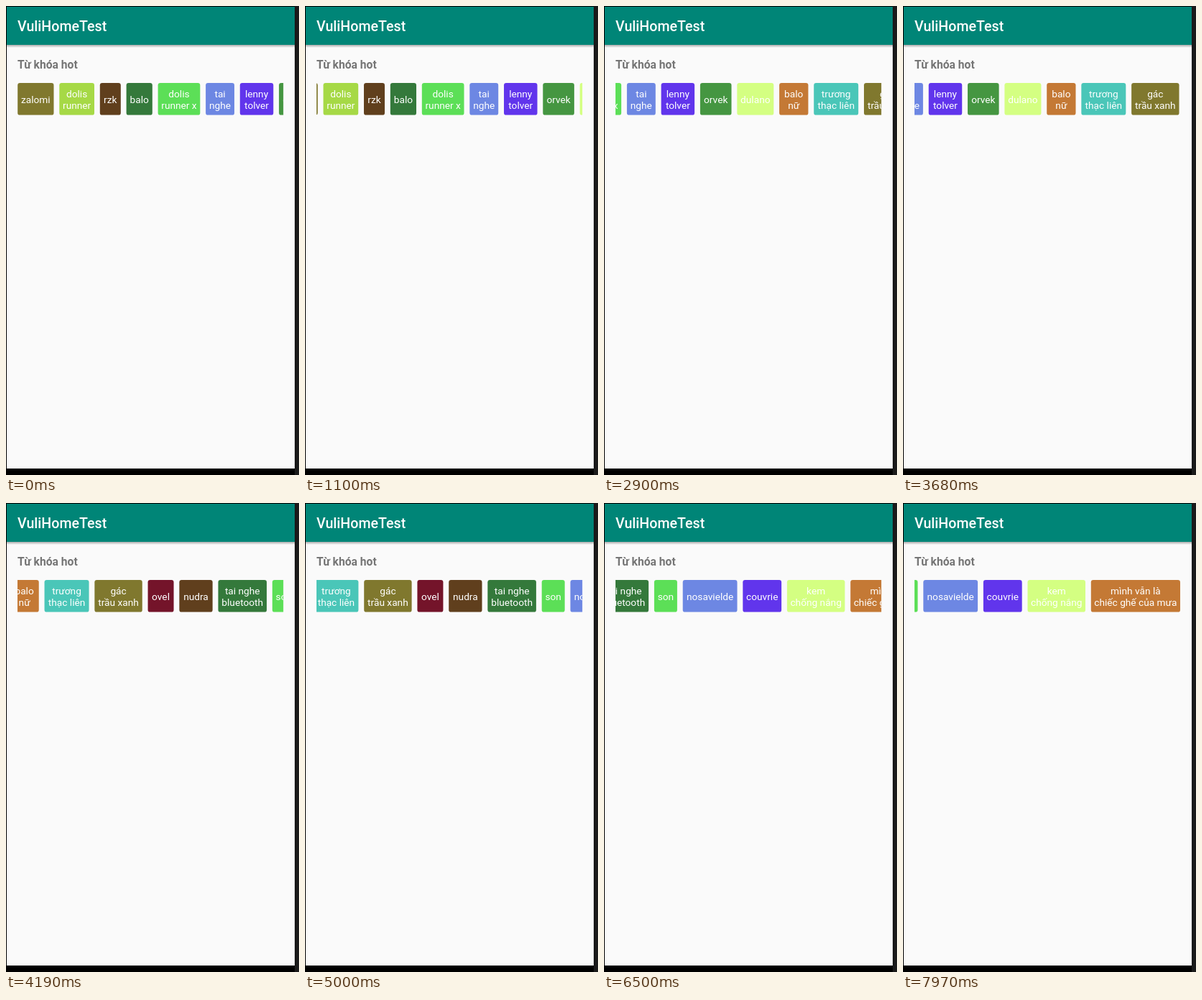
Recreate the animation shown at these times as an HTML page. Size 408 by 652 pixels, loop 8000 ms.

```html
<!DOCTYPE html>
<html lang="vi">
<head>
<meta charset="utf-8">
<title>Home</title>
<style>
  html, body { margin: 0; width: 100%; height: 100%; overflow: hidden; background: #000; }
  svg { display: block; width: 100%; height: 100%; font-family: Roboto, sans-serif; }
  .chip { font-size: 13.7px; fill: #fff; text-anchor: middle; }
</style>
</head>
<body>
<svg viewBox="0 0 408 652">
  <defs>
    <clipPath id="view"><rect x="16" y="106" width="370.2" height="47"/></clipPath>
    <linearGradient id="shade" x2="0" y2="1">
      <stop stop-color="#000" stop-opacity=".32"/>
      <stop offset="1" stop-color="#000" stop-opacity="0"/>
    </linearGradient>
  </defs>
  <rect width="408" height="652" fill="#000"/>
  <rect x="402" width="6" height="652" fill="#1a1a1a"/>
  <rect x="1" y="1" width="401" height="642" fill="#fafafa"/>
  <rect x="1" y="1" width="401" height="53" fill="#008577"/>
  <rect x="1" y="54" width="401" height="4" fill="url(#shade)"/>
  <text x="16" y="35" font-size="19.6" font-weight="500" fill="#fff">VuliHomeTest</text>
  <text x="16" y="87" font-size="15.65" font-weight="700" fill="#757575">Từ khóa hot</text>
  <g clip-path="url(#view)"><g id="row"></g></g>
</svg>
<script>
const LOOP = 8000, STEP = 30, GAP = 7.8;
const row = document.getElementById('row');

// label ("/" breaks the line), width, colour
const chips = [
  ['zalomi', 50.3, '#80782e'],
  ['dolis/runner', 48.7, '#a6d946'],
  ['rzk', 29, '#603f1d'],
  ['balo', 36.2, '#34793b'],
  ['dolis/runner x', 58.7, '#5cdf57'],
  ['tai/nghe', 39.9, '#6d87e3'],
  ['lenny/tolver', 46.5, '#6135ec'],
  ['orvek', 43.6, '#459641'],
  ['dulano', 51, '#d4ff82'],
  ['balo/nữ', 40.3, '#c47935'],
  ['trương/thạc liên', 62, '#4ac6b8'],
  ['gác/trầu xanh', 66.4, '#80782e'],
  ['ovel', 36, '#74142a'],
  ['nudra', 46.3, '#603f1d'],
  ['tai nghe/bluetooth', 67.6, '#34793b'],
  ['son', 32, '#5cdf57'],
  ['nosavielde', 75.8, '#6d87e3'],
  ['couvrie', 53.8, '#6135ec'],
  ['kem/chống nắng', 80.5, '#d4ff82'],
  ['mình vẫn là/chiếc ghế của mưa', 124.2, '#c47935']
];

function add(tag, attrs, text = '') {
  const el = document.createElementNS('http://www.w3.org/2000/svg', tag);
  for (const k in attrs) el.setAttribute(k, attrs[k]);
  el.textContent = text;
  row.append(el);
}

let x = 16.2;
for (const [label, width, fill] of chips) {
  add('rect', { x, y: 107, width, height: 44.6, rx: 3.2, fill });
  const lines = label.split('/');
  lines.forEach((line, i) => add('text', {
    class: 'chip', x: x + width / 2, y: 134.5 - 8 * (lines.length - 1) + 16 * i
  }, line));
  x += width + GAP;
}

const clamp = v => Math.min(1, Math.max(0, v));
const drag = p => p ** 1.4;

// Scroller deceleration: cubic spline solved for time
function fling(p) {
  const curve = (u, a, b) => 3 * u * (1 - u) * ((1 - u) * a + u * b) + u ** 3;
  let lo = 0, hi = 1;
  for (let i = 0; i < 18; i++) {
    const mid = (lo + hi) / 2;
    if (curve(mid, 0.175, 0.35) < p) lo = mid; else hi = mid;
  }
  return curve(hi, 0.5, 1);
}

const bump = p => 1 - (1 - p) ** 1.5;

// start, end, distance, easing
const moves = [
  [470, 830, 19, drag], [830, 1100, 29.8, fling],
  [1670, 2090, 34, drag], [2090, 2450, 66, fling],
  [2480, 2540, 12, drag], [2540, 2900, 85.4, fling],
  [3350, 3910, 92, drag], [3910, 4430, 166, fling],
  [4730, 5280, 59, drag], [5280, 5780, 142, fling],
  [6260, 6460, 52, drag], [6460, 6680, 110, bump]
];

function scrollAt(t) {
  return moves.reduce((sum, [from, to, dist, ease]) =>
    sum + dist * ease(clamp((t - from) / (to - from))), 0);
}

function draw(now) {
  const t = now % LOOP;
  const held = Math.floor((t - 20) / STEP) * STEP + 20;
  row.setAttribute('transform', `translate(${-scrollAt(held).toFixed(2)} 0)`);
}

const origin = performance.now();
function tick() {
  draw(performance.now() - origin);
  requestAnimationFrame(tick);
}
tick();
</script>
</body>
</html>
```
